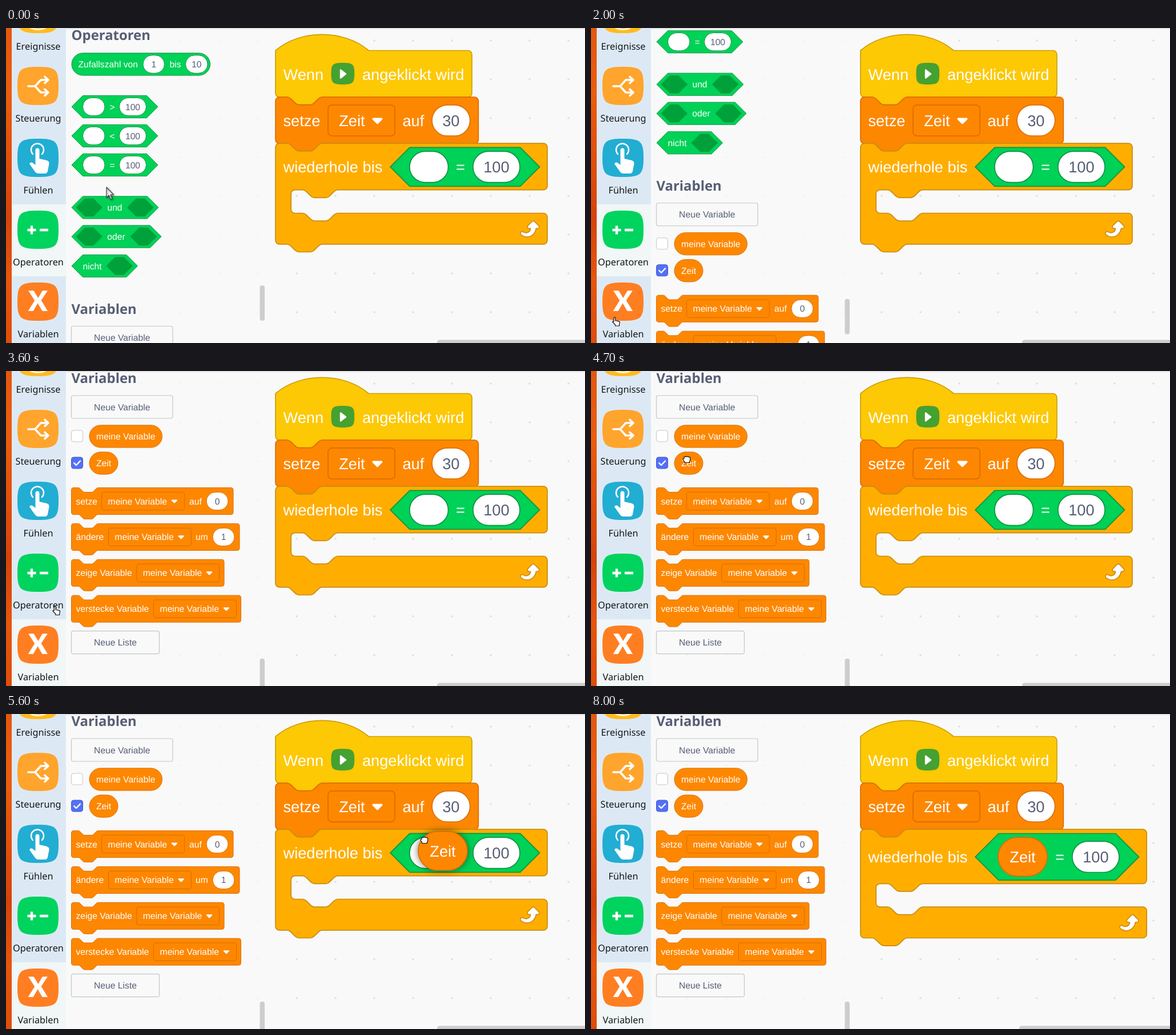
An HTML page with a canvas for the animation above (8800 ms loop, 1014 px wide and 552 px high).

```html
<!DOCTYPE html>
<html lang="de">
<head>
<meta charset="utf-8">
<style>
html, body { margin: 0; width: 100%; height: 100%; overflow: hidden; background: #f9f9f9; }
canvas { display: block; }
</style>
</head>
<body>
<canvas id="stage" width="1014" height="552"></canvas>
<script>
const c = document.getElementById('stage').getContext('2d');
const LOOP = 8800, BIG = 1.7, SMALL = 0.98;
const INK = '#575e75', WHITE = '#fff';
const ORANGE = ['#fd8700', '#db6e00'], GREEN = ['#00d157', '#0a9443'];
const YELLOW = ['#fdc804', '#cc9f08'], AMBER = ['#ffae00', '#c98c12'];
const SANS = '"Liberation Sans", Arial, sans-serif';
const LABEL = '"Noto Sans", "Open Sans", sans-serif', HEAVY = 'Lato, sans-serif';
c.textRendering = 'geometricPrecision';

// Block outlines, in block units
const NOTCH = 'c2 0 3 1 4 2l4 4c1 1 2 2 4 2h12c2 0 3-1 4-2l4-4c1-1 2-2 4-2';
const BACK = 'c-2 0-3 1-4 2l-4 4c-1 1-2 2-4 2h-12c-2 0-3-1-4-2l-4-4c-1-1-2-2-4-2';
const TOP = `M0 4a4 4 0 0 1 4-4H12${NOTCH}`;
const side = (w, h) => `H${w - 4}a4 4 0 0 1 4 4V${h - 4}a4 4 0 0 1-4 4`;
const FOOT = `H48${BACK}H4a4 4 0 0 1-4-4z`;
const stackPath = w => TOP + side(w, 48) + FOOT;
const hatPath = w => 'M0 0c25-22 71-22 96 0' + side(w, 48) + FOOT;
const loopPath = (w, row) => TOP + side(w, row) +
  `H64${BACK}H20a4 4 0 0 0-4 4V${row + 20}a4 4 0 0 0 4 4h8${NOTCH}` + side(w, row + 56) + FOOT;

const SQUIRCLE = 'M-36 0C-36-29-31-33.5 0-33.5S36-29 36 0 31 33.5 0 33.5-36 29-36 0z';
const REPEAT = 'M23.3 11c-.3.6-.9 1-1.5 1h-1.6c-.1 1.3-.5 2.5-1.1 3.6-.9 1.7-2.3 3.2-4.1 4.1-1.7.9-3.6 1.2-5.5.9-1.8-.3-3.5-1.1-4.9-2.3-.7-.7-.7-1.9 0-2.6.6-.6 1.6-.7 2.3-.2H7c.9.6 1.9.9 2.9.9s1.9-.3 2.7-.9c1.1-.8 1.8-2.1 1.8-3.5h-1.5c-.9 0-1.7-.7-1.7-1.7 0-.4.2-.9.5-1.2l4.4-4.4c.7-.6 1.7-.6 2.4 0L23 9.2c.5.5.6 1.2.3 1.8z';
const CURSORS = {
  arrow: 'M1 1v18l4.2-3.8 3 7 2.8-1.2-3-6.8 5.2-.4z',
  point: 'M4 2.2a1.4 1.4 0 0 1 2.8 0V7l5.5.8q2.2.4 2 2.6l-.8 3.4V16H6.5v-2L2 9.5q-.6-1.7 1-1.6l1 .8z',
  open: 'M4.5 16.5v-2L1 10q-.3-1.7 1.5-1.3L4.2 10 3.2 4q.2-1.5 1.7-.9L6.3 7 6.4 2q1-1.3 2 0l.4 5 1-4.5q1.2-1 2 .2l-.3 5 1.4-3q1.4-.5 1.7.8l-1.2 7-.8 2v2z',
  closed: 'M3.5 14.5v-2L1.2 9.5q-.4-2 1.8-2.2V5q1-1.6 2.6-.6 1.2-1.3 2.8-.1 1.6-.9 2.7.5 1.8-.6 2.6 1V10l-1.2 2.7v1.8z'
};

// time, x, y, cursor shape
const MOUSE = [
  [600, 175, 278, 'arrow'], [800, 205, 300, 'open'], [900, 215, 312, 'open'],
  [1200, 85, 340, 'point'], [1300, 40, 346, 'point'], [1400, 40, 346, 'point'],
  [1500, 55, 372, 'point'], [1800, 36, 506, 'point'], [3300, 36, 506, 'point'],
  [3700, 95, 380, 'arrow'], [3900, 125, 270, 'open'], [4200, 160, 148, 'open'],
  [4600, 160, 148, 'open'], [4700, 160, 146, 'closed'], [4900, 160, 146, 'closed'],
  [5100, 290, 152, 'closed'], [5300, 488, 165, 'closed'], [5600, 725, 212, 'closed'],
  [5800, 749, 214, 'closed'], [6000, 749, 214, 'open'], [7100, 749, 214, 'open'],
  [7200, 705, 192, 'open'], [7300, 705, 192, 'open'], [7500, 490, 75, 'open'],
  [7600, 391, 34, 'arrow'], [7800, 391, 34, 'arrow'], [7900, 246, 17, 'arrow']
];
const DRAG = [[5000, 225, 177], [5100, 325, 184], [5300, 558, 203], [5600, 765, 240], [5800, 757, 243]];

function along(keys, t) {
  let i = keys.findLastIndex(k => k[0] <= t);
  if (i < 0) i = 0;
  const a = keys[i], b = keys[i + 1] || a;
  const f = b === a ? 0 : Math.max(0, (t - a[0]) / (b[0] - a[0]));
  return [a[1] + (b[1] - a[1]) * f, a[2] + (b[2] - a[2]) * f, a[3]];
}

function paint(path, fill, stroke, width = 1) {
  if (fill) { c.fillStyle = fill; c.fill(path); }
  if (stroke) { c.strokeStyle = stroke; c.lineWidth = width; c.stroke(path); }
}

function shape(d, x, y, scale, fill, stroke, width) {
  c.save();
  c.translate(x, y);
  c.scale(scale, scale);
  paint(new Path2D(d), fill, stroke, width);
  c.restore();
}

function box(x0, y0, x1, y1, r, fill, stroke, width) {
  const p = new Path2D();
  p.roundRect(x0, y0, x1 - x0, y1 - y0, r);
  paint(p, fill, stroke, width);
}

function hex(x0, x1, cy, h, fill, stroke, width) {
  const r = h / 2;
  paint(new Path2D(`M${x0} ${cy}l${r} ${-r}H${x1 - r}l${r} ${r}l${-r} ${r}H${x0 + r}z`), fill, stroke, width);
}

function text(s, x, cy, size, color = WHITE, align = 'left', font = SANS, weight = '') {
  c.font = `${weight} ${size}px ${font}`;
  c.textAlign = align;
  c.fillStyle = color;
  c.fillText(s, x, cy + size * 0.355);
}

const word = (s, x, cy, k, align) => text(s, x, cy, 16 * k, WHITE, align);
const pill = (x0, x1, cy, h, fill, stroke, k) => box(x0, cy - h / 2, x1, cy + h / 2, h / 2, fill, stroke, k);

function slot(x0, x1, cy, k, stroke, value = '') {
  pill(x0, x1, cy, 32 * k, WHITE, stroke, k);
  text(value, (x0 + x1) / 2, cy, 16 * k, INK, 'center');
}

function dropdown(x0, x1, cy, k, label) {
  box(x0, cy - 16 * k, x1, cy + 16 * k, 4 * k, ORANGE[0], ORANGE[1], k);
  word(label, x0 + 11.3 * k, cy, k);
  c.lineJoin = 'round';
  shape('M-4.3-2H4.3L0 2.3z', x1 - 18 * k, cy + 0.4 * k, k, WHITE, WHITE, 2);
}

function reporter(x0, x1, cy, k, label) {
  pill(x0, x1, cy, 40 * k, ...ORANGE, k);
  word(label, (x0 + x1) / 2, cy, k, 'center');
}

function button(x1, cy, label) {
  box(114.5, cy - 20, x1, cy + 20, 3.5, '#f9f9f9', '#c3c5ca', 1.2);
  text(label, (114.5 + x1) / 2, cy, 15.7, INK, 'center');
}

const heading = (s, cy) => text(s, 114.5, cy, 23.9, INK, 'left', LABEL, 'bold');

function operators() {
  const k = SMALL, edge = GREEN[1];
  heading('Operatoren', 13);
  pill(115, 357.5, 63.5, 40 * k, ...GREEN, k);
  word('Zufallszahl von', 126.5, 63.5, k);
  slot(240, 277.5, 63.5, k, edge, '1');
  word('bis', 286.5, 63.5, k);
  slot(314.5, 353, 63.5, k, edge, '10');
  ['>', '<', '='].forEach((op, i) => {
    const y = 138 + 51 * i;
    hex(115, 266, y, 40 * k, ...GREEN, k);
    slot(134.5, 173, y, k, edge);
    word(op, 186, y, k, 'center');
    slot(198.5, 245.5, y, k, edge, '100');
  });
  [['und', 314.5, 267, 190.5, 212], ['oder', 365.5, 272, 193, 217.5], ['nicht', 417, 230.5, 151, 175.5]]
    .forEach(([s, y, right, mid, hole], i) => {
      hex(115, right, y, 40 * k, ...GREEN, k);
      if (i < 2) hex(122.5, 169, y, 32 * k, '#00a13a');
      word(s, mid, y, k, 'center');
      hex(hole, hole + 46.5, y, 32 * k, '#00a13a');
    });
}

function variables() {
  const k = SMALL, name = 'meine Variable';
  heading('Variablen', 13);
  button(292, 63, 'Neue Variable');
  box(114.5, 104, 134.5, 124, 4, WHITE, '#c6c6c6', 1);
  reporter(146, 273.5, 114.5, k, name);
  box(114.5, 151, 134.5, 171, 4, '#5470f8', '#4059c9', 1);
  c.lineCap = c.lineJoin = 'round';
  shape('M119.3 161.3l3.7 3.7 7-7.3', 0, 0, 1, null, WHITE, 2.4);
  reporter(146, 196, 161.5, k, 'Zeit');
  [['setze', 398, 167.5, 'auf', 321, '0'], ['ändere', 409, 179.3, 'um', 332, '1'],
   ['zeige Variable', 382, 228.7], ['verstecke Variable', 411.5, 258.5]]
    .forEach(([s, right, menu, joiner, jx, value], i) => {
      const y = 204.5 + 62.9 * i, mid = y + 24 * k;
      shape(stackPath((right - 114.5) / k), 114.5, y, k, ...ORANGE);
      word(s, 122.5, mid, k);
      dropdown(menu, menu + 145, mid, k, name);
      if (joiner) {
        word(joiner, jx, mid, k);
        slot(right - 47, right - 9, mid, k, ORANGE[1], value);
      }
    });
  button(268.5, 475.7, 'Neue Liste');
}

function script(dropped) {
  const x = 472, k = BIG;
  shape(hatPath(202.3), x, 39.5, k, ...YELLOW);
  word('Wenn', 485.5, 81, k);
  shape(SQUIRCLE, 589.8, 80, 0.565, '#45a131');
  c.lineJoin = 'round';
  shape('M586 73.5v14l9-7z', 0, 0, 1, WHITE, WHITE, 2.4);
  word('angeklickt wird', 624, 81, k);

  shape(stackPath(209), x, 121, k, ...ORANGE);
  word('setze', 485.5, 162, k);
  dropdown(564, 681, 162, k, 'Zeit');
  word('auf', 694.5, 162, k);
  slot(746, 812.7, 162, k, ORANGE[1], '30');

  const row = dropped ? 56 : 48, w = dropped ? 294.8 : 280;
  const mid = dropped ? 250.3 : 243.4, shift = dropped ? 25 : 0;
  shape(loopPath(w, row), x, 202.1, k, ...AMBER);
  word('wiederhole bis', 485.5, mid, k);
  hex(673, 934.5 + shift, mid, dropped ? 81.6 : 68, ...GREEN, k);
  if (dropped) reporter(713, 799, mid, k, 'Zeit');
  else slot(706.8, 774.5, mid, k, GREEN[1]);
  word('=', 796 + shift, mid, k, 'center');
  slot(817.8 + shift, 900 + shift, mid, k, GREEN[1], '100');
  shape(REPEAT, 894 + shift, 331 + (row - 48) * k, k, WHITE, '#cf8b17', 1);
}

function sidebar(onVariables) {
  const edge = c.createLinearGradient(0, 0, 0, 552);
  ['#e3570f', '#ea5d10', '#e2500c', '#d6430a', '#e5560e', '#df4d0b']
    .forEach((s, i) => edge.addColorStop(i / 5, s));
  c.fillStyle = edge;
  c.fillRect(0, 0, 10, 552);
  c.fillStyle = '#dce9f5';
  c.fillRect(10, 0, 95, 552);
  c.fillStyle = '#f1f6f6';
  c.fillRect(10, onVariables ? 435 : 309, 95, 126);

  [['Ereignisse', '#ffbb1f'], ['Steuerung', '#ffa42c'], ['Fühlen', '#22add3'],
   ['Operatoren', '#00d35e'], ['Variablen', '#ff7e22']].forEach(([s, color], i) => {
    const y = -24.5 + 126 * i;
    shape(SQUIRCLE, 56, y, 1, color);
    text(s, 56.5, y + 56.5, 16.3, '#151515', 'center', LABEL);
  });

  c.lineCap = c.lineJoin = 'round';
  shape('M44 0q12 5 24 0', 0, 0, 1, null, '#fff3cf', 3);
  shape('M39 102H51L61 91H73M51 102L61 113H73M68 85.5l6 5.5-6 5.5M68 107.5l6 5.5-6 5.5', 0, 0, 1, null, WHITE, 3.6);
  shape('M47 221a11 11 0 1 1 16 0', 0, 0, 1, null, WHITE, 2.5);
  shape('M51.5 214a3.5 3.5 0 0 1 7 0v15l13 3q4.5 1.5 4 6l-2.5 13q-1 4-5 4H56q-3 0-5-3l-10-14q2-4 6-1.5l4.5 3.5z', 0, 0, 1, WHITE);
  c.lineCap = 'butt';
  shape('M37.5 354h15M45 346.5v15M59 354h15', 0, 0, 1, null, WHITE, 4.4);
  text('X', 56, 479, 49, WHITE, 'center', HEAVY, 900);
}

function dots(x0, x1, color) {
  c.fillStyle = color;
  for (let x = 33; x < 1014; x += 68)
    for (let y = 22; y < 552; y += 68)
      if (x > x0 && x < x1) c.fillRect(x - 1.5, y - 1.5, 3, 3);
}

function draw(t) {
  const scroll = t < 2000 ? 0 : t < 2100 ? 0.45 : t < 2200 ? 0.9 : 1;
  const dropped = t >= 6000;
  c.fillStyle = '#f9f9f9';
  c.fillRect(0, 0, 1014, 552);
  dots(453, 1014, '#dedede');
  dots(105, 453, '#f2f2f2');
  script(dropped);

  c.save();
  c.translate(0, -479.5 * scroll);
  if (scroll < 1) operators();
  c.translate(0, 479.5);
  variables();
  c.restore();

  const thumb = 451 + 53 * scroll;
  box(444.5, thumb, 453, thumb + 62, 4, '#cecdce');
  box(dropped ? 750 : 755, 546.5, 1030, 556, 4.5, '#cecdce');
  sidebar(scroll > 0.5);

  const shade = c.createLinearGradient(0, 0, 0, 3);
  shade.addColorStop(0, '#d4d4d8');
  shade.addColorStop(1, 'rgba(225,225,228,0)');
  c.fillStyle = shade;
  c.fillRect(105, 0, 909, 3);

  if (t >= 5000 && !dropped) {
    const [x, y] = along(DRAG, t);
    c.save();
    c.shadowColor = 'rgba(0,0,0,.6)';
    c.shadowBlur = 13;
    pill(x - 43, x + 43, y, 68, ORANGE[0]);
    c.restore();
    reporter(x - 43, x + 43, y, BIG, 'Zeit');
  }

  if (t < 8000) {
    const [x, y, kind] = along(MOUSE, t), arrow = kind === 'arrow';
    c.save();
    c.lineJoin = 'round';
    if (arrow) {
      c.shadowColor = 'rgba(0,0,0,.4)';
      c.shadowBlur = 3;
      c.shadowOffsetX = c.shadowOffsetY = 1.5;
    }
    shape(CURSORS[kind], x, y, 1, arrow ? '#f4f4f4' : WHITE, arrow ? '#444' : '#111', 1.2);
    c.restore();
  }
}

function frame() {
  draw(Math.floor(performance.now() % LOOP / 100) * 100);
  requestAnimationFrame(frame);
}
frame();
</script>
</body>
</html>
```
